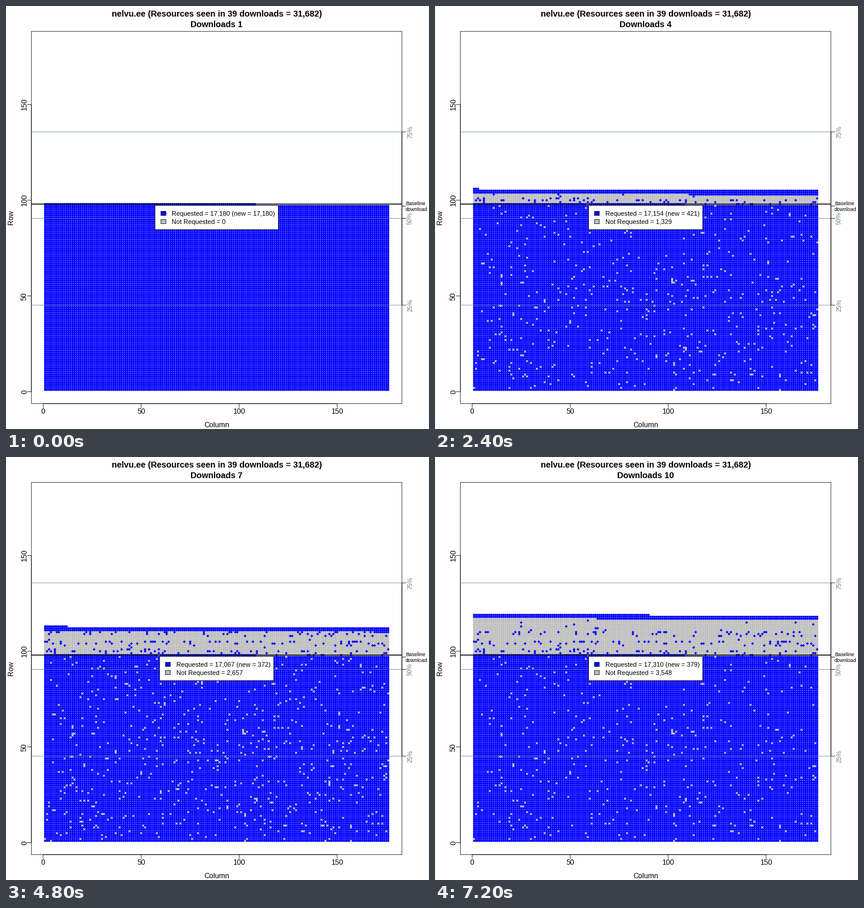
These frames come from a looping animation (720 by 720 pixels, 8 s). A matplotlib script:

```python
import numpy as np
import matplotlib.pyplot as plt
from matplotlib.animation import FuncAnimation
from matplotlib.patches import Rectangle

plt.rcParams["font.family"] = "Liberation Sans"

SIZE, DPI = 720, 72
LEFT, RIGHT, TOP, BOTTOM = 43.2, 673.92, 43.2, 676.8
MID_X = (LEFT + RIGHT) / 2
COLS, ROWS = 176, 181
BLUE, GREY, SLATE = "#0000FF", "#BEBEBE", "#68838B"
THIN = 0.75

# Counts printed in the legend, one per download
NEW = [17180, 488, 394, 421, 421, 448, 372, 377, 378, 379]
MISSED = [0, 403, 845, 1329, 1607, 2024, 2657, 2772, 3148, 3548]
SEEN = np.cumsum(NEW)


def px(col):
    return LEFT + (col + 6) * (RIGHT - LEFT) / 189


def py(row):
    return BOTTOM - (row + 6.2) * (BOTTOM - TOP) / 194.4


rng = np.random.default_rng(39)
cell = np.arange(SEEN[-1])
points = np.column_stack([px(cell % COLS + 1), py(cell // COLS + 1)])
batch = np.searchsorted(SEEN, cell, side="right")
# Early odd batches are often requested again, the others hardly ever
lasting = (batch % 2 == 1) & (batch < 6)
returns = rng.random(cell.size) < np.where(lasting, 0.15, 0.008)
gap_order = rng.permutation(SEEN[0])

fig = plt.figure(figsize=(SIZE / DPI, SIZE / DPI), dpi=DPI, facecolor="white")
ax = fig.add_axes([0, 0, 1, 1])
ax.set_xlim(0, SIZE)
ax.set_ylim(SIZE, 0)
ax.axis("off")


def line(xs, ys, color="black", width=THIN):
    ax.plot(xs, ys, color=color, lw=width, snap=False, zorder=3,
            solid_capstyle="butt", solid_joinstyle="miter")


def label(x, y, text, size=12.4, **style):
    style = {"ha": "center", "va": "baseline", "zorder": 6, **style}
    return ax.text(x, y, text, fontsize=size, **style)


def upright(x, y, text, size=12.4, color="black"):
    label(x, y, text, size, color=color, rotation=90, rotation_mode="anchor")


def box(x, y, w, h, fill, z):
    return ax.add_patch(Rectangle((x, y), w, h, facecolor=fill, snap=False,
                                  edgecolor="black", lw=THIN, zorder=z))


dots = ax.scatter([], [], s=3.8 ** 2, linewidths=0, zorder=2, snap=False)

# Frame, axes and reference lines
line([LEFT, RIGHT, RIGHT, LEFT, LEFT], [TOP, TOP, BOTTOM, BOTTOM, TOP])
line([px(0), px(150)], [BOTTOM, BOTTOM])
line([LEFT, LEFT], [py(0), py(150)])
for tick in range(0, 151, 50):
    line([px(tick)] * 2, [BOTTOM, BOTTOM + 7.2])
    line([LEFT, LEFT - 7.2], [py(tick)] * 2)
    label(px(tick), 694, str(tick))
    upright(35, py(tick), str(tick))
label(MID_X, 717, "Column")
upright(12, 360, "Row")

line([LEFT, RIGHT], [py(98)] * 2, width=1.5)
for percent in (25, 50, 75):
    y = py(ROWS * percent / 100)
    line([LEFT, RIGHT], [y, y], SLATE)
    line([RIGHT, RIGHT + 7.2], [y, y])
    upright(691, y, f"{percent}%", 10.8, SLATE)
line([RIGHT, RIGHT], [py(ROWS * 0.25), py(ROWS * 0.75)])
line([RIGHT, RIGHT + 7.2], [py(97)] * 2)
label(680, 339, "Baseline", 8.8, ha="left")
label(680, 349, "download", 8.8, ha="left")

label(MID_X, 18, "nelvu.ee (Resources seen in 39 downloads = 31,682)", 14.4,
      weight="bold")
heading = label(MID_X, 36, "", 14.4, weight="bold")

panel = box(0, 339.4, 0, 41.2, "white", 4)
keys = [box(0, 349.4, 8.4, 7.2, BLUE, 5), box(0, 363.4, 8.4, 7.2, GREY, 5)]
notes = [label(0, 357, "", 11, ha="left"), label(0, 371, "", 11, ha="left")]


def draw(k):
    seen, missed, new = SEEN[k], MISSED[k], NEW[k]
    grey = (batch > 0) & (batch < k) & ~returns
    grey[gap_order[:max(0, missed - grey.sum())]] = True
    blue = ~grey & (cell < seen)
    dots.set_offsets(np.vstack([points[grey], points[blue]]))
    dots.set_facecolor([GREY] * grey.sum() + [BLUE] * blue.sum())

    heading.set_text(f"Downloads {k + 1}")
    notes[0].set_text(f"Requested = {seen - missed:,} (new = {new:,})")
    notes[1].set_text(f"Not Requested = {missed:,}")
    half = 97.2 if new < 1000 else 104.8
    left = MID_X - half
    panel.set_x(left)
    panel.set_width(2 * half)
    for key, note in zip(keys, notes):
        key.set_x(left + 10)
        note.set_x(left + 28.5)
    return [dots, heading, panel, *keys, *notes]


anim = FuncAnimation(fig, draw, frames=len(NEW), interval=800,
                     init_func=lambda: draw(0), repeat=True, repeat_delay=0)
plt.show()
```
